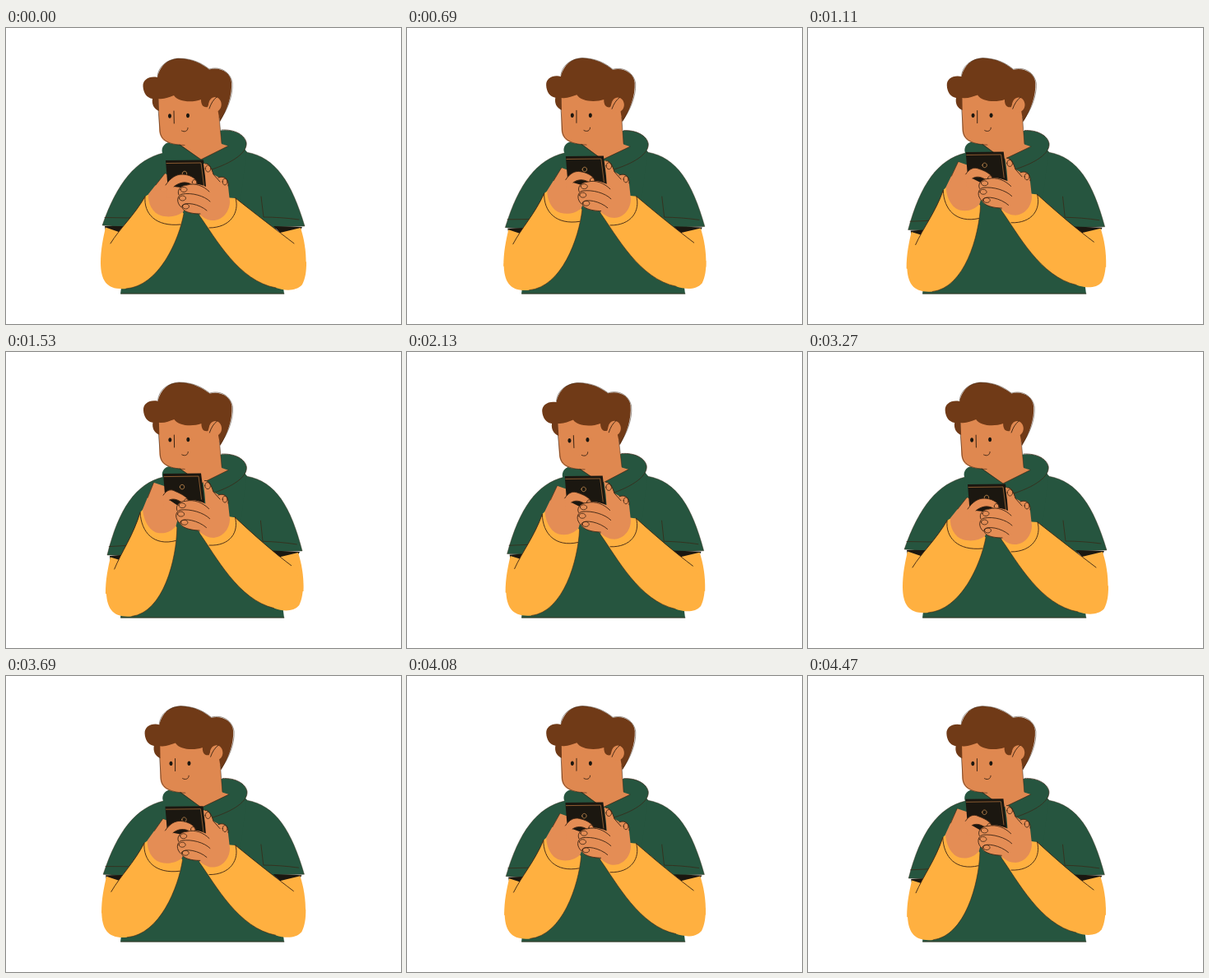
Animation of 480x360 px, one loop 4.5 s. Source, as an HTML page:

```html
<!DOCTYPE html>
<html lang="en">
<head>
<meta charset="utf-8">
<title>Texting</title>
<style>
html, body { margin: 0; width: 100%; height: 100%; overflow: hidden; background: #fff; }
svg { display: block; width: 100vw; height: 100vh; }
</style>
</head>
<body>
<svg id="stage" viewBox="0 0 480 360" xmlns="http://www.w3.org/2000/svg"></svg>
<script>
const LOOP = 4500, STEP = 30, SWAY = 3240;
const GREEN = '#26553f', YELLOW = '#ffb040', SKIN = '#df8850', HAND = '#e48d55',
      HAIR = '#703a17', DARK = '#1b1710', LINE = '#3b2414';
const stage = document.getElementById('stage');
const clamp = v => Math.max(0, Math.min(1, v));
const mix = (a, b, u) => a + (b - a) * u;

// Each field gives the full shift of a point when the phone is raised.
const fields = {
  sleeveL: (x, y) => { const w = clamp((y - 160) / 80) * clamp((190 - x) / 60); return [6 * w, 7 * w]; },
  sleeveR: (x, y) => { const w = clamp((y - 160) / 80) * clamp((x - 290) / 60); return [-3 * w, w]; },
  // Bends with the distance from elbow to wrist.
  armL: (x, y) => {
    const u = Math.max(0, (x - 125) * 0.6 - (y - 300) * 0.8) / 110, w = u ** 1.5;
    return [7 - 14.5 * w, 4.5 - 16 * w];
  },
  armR: (x, y) => {
    const u = clamp((365 - x) / 100);
    return [mix(-4, 0, u), mix(-4 * clamp((y - 243) / 35), -8, u * u)];
  },
  handR: (x, y) => { const u = clamp((x - 215) / 40); return [mix(-2, 0, u), mix(-10, -8, u)]; },
  thumb: (x, y) => { const u = clamp((x - 195) / 25); return [mix(-3, -10, u), mix(-17, -6, u)]; },
  phone: () => [-3, -13]
};

const moving = [];
function add(parent, tag, attrs) {
  const el = document.createElementNS(stage.namespaceURI, tag);
  for (const k in attrs) el.setAttribute(k, attrs[k]);
  return parent.appendChild(el);
}
function shape(parent, d, fill, field, stroke = 'none', width = 0.8) {
  const el = add(parent, 'path', { d, fill, stroke, 'stroke-width': width,
    'stroke-linecap': 'round', 'stroke-linejoin': 'round' });
  if (field) moving.push({ el, d, field: fields[field] });
  return el;
}
const line = (parent, d, field, width = 0.9, color = LINE) => shape(parent, d, 'none', field, color, width);
// Ellipse as a path, so it can follow a field.
function oval(x, y, rx, ry) {
  const k = 0.5523, p = (a, b) => (x + a * rx).toFixed(2) + ' ' + (y + b * ry).toFixed(2);
  return `M${p(-1, 0)} C${p(-1, -k)} ${p(-k, -1)} ${p(0, -1)} C${p(k, -1)} ${p(1, -k)} ${p(1, 0)}` +
    ` C${p(1, k)} ${p(k, 1)} ${p(0, 1)} C${p(-k, 1)} ${p(-1, k)} ${p(-1, 0)} Z`;
}

// Body and sleeves
shape(stage, 'M191 152 L205 141 L285 141 L293 151 L328 242 L338 323.5 L139 323.5 L150 240 L165 190 Z', GREEN);
line(stage, 'M140 323 L338 323', null, 0.6);
shape(stage, 'M191 152 C158 160 135 188 117 240 L142 242 L185 205 Z', GREEN, 'sleeveL');
shape(stage, 'M292 151 C328 157 347 188 363 241 L327 242 L285 210 Z', GREEN, 'sleeveR');
line(stage, 'M191 152 C158 160 135 188 117 240 L142 242', 'sleeveL', 0.4);
line(stage, 'M292 151 C328 157 347 188 363 241 L328 242', 'sleeveR', 0.4);
line(stage, 'M120 230.5 L152 231', 'sleeveL', 0.7);
line(stage, 'M310 205 L313 230 C326 230 342 231 356 233', 'sleeveR', 0.7);

// Head, neck and hood
const head = add(stage, 'g', {});
shape(head, 'M258 125 C272 122 289 127 292 139 C294 151 276 165 246 173 L232 166 L196 160 L190 152 C188 145 193 138 204 138 L240 136 Z', GREEN);
line(head, 'M262 124 C278 123 290 130 292 139 C294 151 276 164 247 173', null, 0.7);
shape(head, 'M185 84 L186 121 C186 135 192 141 212 142 L237 160 L270 143.5 L262 141 L259 108 L260 90 L245 78 L200 74 Z', SKIN);
line(head, 'M185 99 L187 123 C187 135 195 142 217 142.5', null, 0.6);
line(head, 'M211 142 L237 160 L270 143.5', null, 0.7);
line(head, 'M259 108 L262 140', null, 0.5);
shape(head, 'M166.5 71 C166 63 174 58 184 60 C187 46 197 37 210 37 C226 37 239 44 247 50.5 C260 47 273 54 274 66 C275 82 269 99 260 114 L257 98 L248 88 L245 96 C240 97 237 94 237 87 C226 91 209 90 204 82 C198 84 192 87 185.5 86 L186 101 C179 98 177 92 178 86 C171 85 167 79 166.5 71 Z', HAIR);
line(head, 'M184 59 C185 47 195 38.5 209 37 C227 37 238 43 247 50 C261 46 273 54 275 67 C276 82 269 100 260 112', null, 0.5);
shape(head, oval(254, 93, 7.7, 9), SKIN);
line(head, 'M247 98 C249 92 252 87 256 84', null, 0.9);
shape(head, oval(199, 107, 2, 2.7), DARK);
shape(head, oval(221, 106.5, 2, 2.7), DARK);
line(head, 'M204 101 L204.3 116', null, 1);
line(head, 'M213.5 125 C217 127 221 125.5 221 121.5', null, 0.9);

// Openings of the sleeves and upper arms
shape(stage, 'M120 241 L144 241 L137 250 L121 247 Z', DARK, 'sleeveL');
shape(stage, 'M325 241 L360 242 L357 247 L334 250 Z', DARK, 'sleeveR');
shape(stage, 'M121 242.5 L137 248 L142 262 L130 292 L115 287 C115 269 118 256 121 242.5 Z', YELLOW, 'sleeveL');
shape(stage, 'M358 243 L333 249 L325 262 L345 292 L364.5 290 C365 270 362 256 358 243 Z', YELLOW, 'sleeveR');

// Forearms
shape(stage, 'M127 262 C138 244 156 228 169 205 L192 190 L216 226 C210 258 186 314 146 317 C124 319 115 309 115 285 Z', YELLOW, 'armL');
line(stage, 'M127 262 C138 244 156 228 169 205', 'armL');
line(stage, 'M216 226 C210 258 186 314 146 317', 'armL', 0.6);
shape(stage, 'M350 262 C329 246 303 226 279 207 L250 205 L235 228 C255 256 283 308 328 316 C340 320 353 320 360 312 C364 304 365 296 365 285 Z', YELLOW, 'armR');
line(stage, 'M279 207 C303 226 329 246 350 262', 'armR');
line(stage, 'M235 228 C255 256 283 308 328 316', 'armR', 0.6);

// Left palm
shape(stage, 'M193 177 L173 202 C172 213 178 225 188 228 C198 231 208 229 215 224 L228 200 L222 188 Z', HAND, 'armL');
line(stage, 'M169 205 C167 226 182 242 212 239', 'armL');
line(stage, 'M193 177 L182 191', 'armL', 0.7);

// Phone
shape(stage, 'M194 161 L240 160.5 L244 193 L244 199 L197 199 Z', DARK, 'phone');
line(stage, 'M195 164.5 L237 164 L240.5 192', 'phone', 0.7, '#b9783f');
line(stage, oval(217, 177, 2.7, 2.8), 'phone', 0.8, '#c38b50');

// Left fingers
const finger = 'M194 191 C200 182 207 178 214 178 C222 178 230 182 232 187 C233 191 229 192 225 190 C218 186 210 188 204 193';
shape(stage, finger + ' L222 195 L215 206 L195 207 Z', HAND, 'thumb');
line(stage, finger, 'thumb');
line(stage, oval(229, 187.5, 2.7, 3), 'thumb', 0.8);

// Right hand
shape(stage, 'M240 165 C246 163 250 171 252 178 L259 182 C266 179 271 185 270 193 L272 211 C272 224 262 235 250 234 C244 234 238 229 234 226 C224 226 215 223 213 218 C208 214 207 208 210 203 C208 197 213 191 220 191 C228 188 236 190 243 193 L242 180 Z', HAND, 'handR');
line(stage, 'M242 165 C247 164 250 171 252 178 L260 187', 'handR');
line(stage, 'M258 182 C265 179 271 184 270 192', 'handR');
line(stage, 'M210 203 C207 197 213 191 220 191 C230 188 240 192 247 199', 'handR');
line(stage, 'M213 218 C207 213 207 204 214 202 C226 200 241 204 248 211', 'handR');
line(stage, 'M236 226 C224 226 213 223 214 216 C218 211 235 214 244 222', 'handR');
for (const [x, y, rx, ry] of [[216, 196.5, 4, 3], [214.5, 207, 4, 3], [218.5, 217, 4, 3],
  [245.5, 171, 3.2, 4], [266, 187, 2.8, 4]])
  line(stage, oval(x, y, rx, ry), 'handR', 0.8);
line(stage, 'M279 207 C284 224 273 243 247 243', 'armR');

function draw(ms) {
  const phase = 2 * Math.PI * ms / SWAY, lift = (1 - Math.cos(phase)) / 2;
  head.setAttribute('transform', `rotate(${1.3 * Math.sin(phase)} 235 190)`);
  for (const { el, d, field } of moving)
    el.setAttribute('d', d.replace(/([\d.]+) ([\d.]+)/g, (m, x, y) => {
      const [dx, dy] = field(+x, +y);
      return (+x + dx * lift).toFixed(2) + ' ' + (+y + dy * lift).toFixed(2);
    }));
}
const start = performance.now();
function tick() {
  const t = (performance.now() - start) % LOOP;
  draw(Math.floor(t / STEP) * STEP);
  requestAnimationFrame(tick);
}
tick();
</script>
</body>
</html>
```
